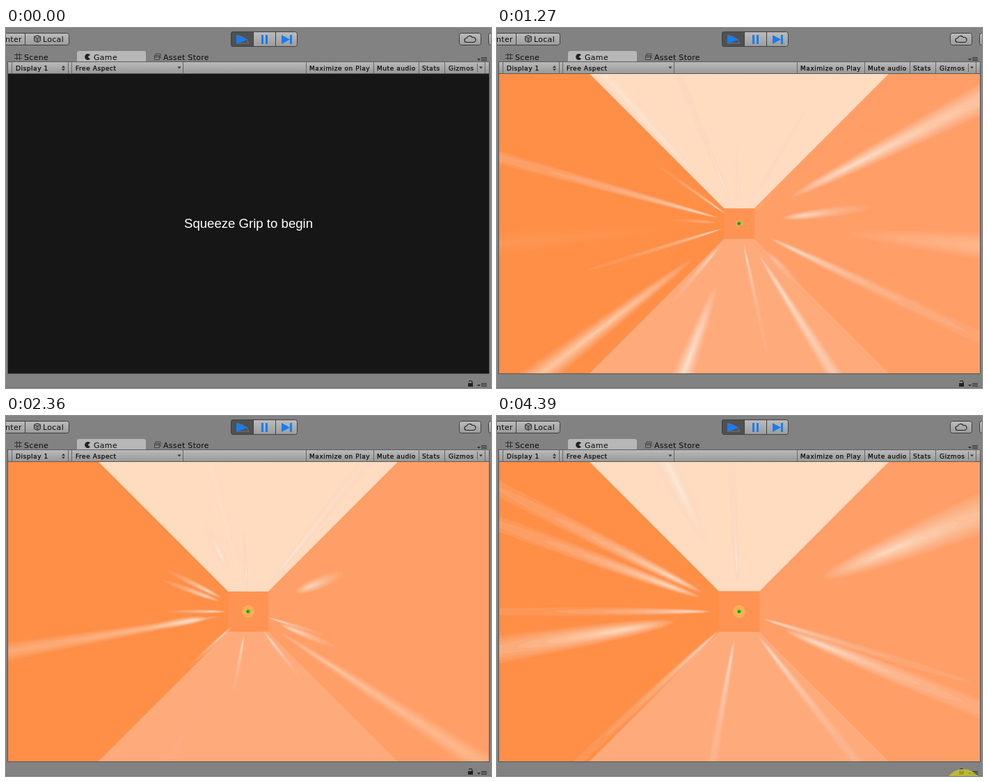
An HTML page with a canvas that plays this animation: 697 px wide and 517 px high, repeating every 4.46 s.

```html
<!DOCTYPE html>
<html lang="en">
<head>
<meta charset="utf-8">
<title>Tunnel preview</title>
<style>
html, body { margin: 0; width: 100%; height: 100%; overflow: hidden; background: #828282; }
canvas { position: absolute; left: 3px; top: 66px; }
svg { position: absolute; left: 0; top: 0; }
.tab { font: 11px "DejaVu Sans", Verdana, sans-serif; letter-spacing: .3px; fill: #0a0a0a; }
.bar { font: 9px "DejaVu Sans", Verdana, sans-serif; letter-spacing: .55px; fill: #0a0a0a; stroke: #0a0a0a; stroke-width: .25px; }
.prompt { font: 18.6px "Liberation Sans", Arial, sans-serif; fill: #fff; }
</style>
</head>
<body>
<canvas id="view" width="691" height="430"></canvas>
<svg width="697" height="517" viewBox="0 0 697 517">
  <defs>
    <linearGradient id="btn" x2="0" y2="1"><stop stop-color="#bcbcbc"/><stop offset="1" stop-color="#9c9c9c"/></linearGradient>
    <linearGradient id="strip" x2="0" y2="1"><stop stop-color="#b9b9b9"/><stop offset="1" stop-color="#989898"/></linearGradient>
    <g id="menu"><path d="M0 2h5l-2.500 3z" fill="#333"/><path d="M6 .5h8M6 2.500h8M6 4.500h8" stroke="#333"/></g>
  </defs>

  <!-- main toolbar -->
  <g fill="url(#btn)" stroke="#3f3f3f">
    <rect x="-12.500" y="7.500" width="103" height="17" rx="3"/>
    <rect x="323.500" y="5.500" width="95" height="21" rx="3"/>
    <rect x="651.500" y="7.500" width="31" height="17" rx="3"/>
    <rect x="693.500" y="7.500" width="20" height="17" rx="3"/>
    <path d="M27.500 8v16M387.500 6v20" fill="none"/>
    <path d="M355.500 5.500V26.500H326.500a3 3 0 0 1-3-3V8.500a3 3 0 0 1 3-3z" fill="#505050"/>
  </g>
  <path d="M332 10.500v11.500h17q-4-9-17-11.500z" fill="none" stroke="#777"/>
  <path d="M331 10l17 6.500-17 6.500zM367 10h3v13h-3zM373 10h3v13h-3zM396 10l12 6.500-12 6.500zM408 10h3v13h-3z" fill="#187df0"/>
  <path d="M662 20.500a3 3 0 0 1 0-6 4.500 4.500 0 0 1 8-1 3.500 3.500 0 0 1 2.500 7z" fill="none" stroke="#222" stroke-width="1.200"/>
  <path d="M45 10.500l4.500 2v6l-4.500 2-4.500-2v-6zM40.500 12.500l4.500 2 4.500-2M45 14.500v6" fill="#888" stroke="#333"/>
  <text class="tab" x="-1" y="20">nter</text>
  <text class="tab" x="53" y="20">Local</text>

  <!-- tabs -->
  <path d="M102 49V36q0-3 3-3H198q3 0 3 3V49z" fill="#b7b7b7"/>
  <path d="M15.500 36v10M19.500 36v10M12 38.500h11M12 43.500h11" stroke="#333" fill="none"/>
  <path d="M117.500 41.500L121 38.500A4.500 4.500 0 1 0 121 44.500z" fill="#222"/>
  <path d="M213.500 39.500h7v6h-7zM215 39v-2h7v7M213.500 41.500h7" fill="none" stroke="#444"/>
  <text class="tab" x="26" y="46">Scene</text>
  <text class="tab" x="126" y="46">Game</text>
  <text class="tab" x="226" y="46">Asset Store</text>
  <use href="#menu" x="677" y="42"/>

  <!-- view strip -->
  <rect x="2" y="49" width="692" height="17" fill="url(#strip)"/>
  <path d="M2 48.500H694M2 65.500H694" stroke="#5a5a5a"/>
  <path d="M8.500 49V65M89.500 49V65M94.500 49V65M254.500 49V65M431.500 49V65M528.500 49V65M593.500 49V65M630.500 49V65M677.500 51V63M688.500 49V65" stroke="#666"/>
  <path d="M80 57l2.500-3 2.500 3zM80 58.500l2.500 3 2.500-3zM246.500 55.500h5l-2.500 3zM680 55.500h5l-2.500 3z" fill="#333"/>
  <g class="bar">
    <text x="14" y="61">Display 1</text>
    <text x="100" y="61">Free Aspect</text>
    <text x="436" y="61">Maximize on Play</text>
    <text x="533" y="61">Mute audio</text>
    <text x="598" y="61">Stats</text>
    <text x="636" y="61">Gizmos</text>
  </g>
  <path d="M2.500 49V496.500H694.500V49" fill="none" stroke="#555"/>
  <path d="M0 516.500H697" stroke="#767676"/>

  <!-- bottom panel -->
  <path d="M664 510h7v5h-7z" fill="#222"/>
  <path d="M665.500 508q0-1.500 2-1.500t2.500 2v2" fill="none" stroke="#222" stroke-width="1.200"/>
  <use href="#menu" x="677" y="510"/>

  <text id="prompt" class="prompt" x="256" y="287">Squeeze Grip to begin</text>
  <path id="pointer" d="M.5.5V16l3.500-3.500 2.500 6 2.500-1-2.500-5.500H11.500z" fill="#fff" stroke="#000"/>
  <circle id="press" cx="670" cy="534" r="27" fill="#d2d01e" fill-opacity=".7"/>
</svg>
<script>
const LOOP = 4460, START = 500, STEP = 77.4, LAST = 27;
const CX = 348, CY = 280.8, SPEED = 0.002, LAYERS = 12, COUNT = 70;
const $ = id => document.getElementById(id);
const ctx = $('view').getContext('2d');
ctx.translate(-3, -66);

const clamp = x => Math.max(0, Math.min(1, x));
const lerp = (a, b, x) => a + (b - a) * x;
const rand = n => {
  const x = Math.sin(n * 12.9898) * 43758.5453;
  return x - Math.floor(x);
};

// Passing streaks: spread by the golden angle, dense at first, then sparser.
const streaks = Array.from({ length: COUNT }, (_, i) => ({
  angle: i * 137.508 % 360 - 180,
  inner: 24 + 90 * rand(i + 1) ** 2,
  at: 23 * (i / COUNT) ** 1.8 - 1,
  span: 5
}));

// Streaks that stay when the view freezes: angle, inner radius.
const resting = [
  [-116, 110], [-93, 40], [-22, 130], [-153, 60], [-160, 60], [180, 40],
  [171, 95], [137, 40], [100, 40], [52, 45], [17, 35], [22, 70]
];
for (const [angle, inner] of resting) streaks.push({ angle, inner, at: LAST, span: 8 });

function poly(fill, ...p) {
  ctx.fillStyle = fill;
  ctx.beginPath();
  for (let i = 0; i < p.length; i += 2) ctx.lineTo(p[i], p[i + 1]);
  ctx.fill();
}

function disc(fill, x, y, r) {
  ctx.fillStyle = fill;
  ctx.beginPath();
  ctx.arc(x, y, r, 0, 7);
  ctx.fill();
}

// A soft ellipse in (depth, angle) space, projected by radius = 1 / depth.
function drawStreak({ angle, inner, at, span }, k) {
  const weight = clamp(1.6 * (1 - Math.abs(k - at) / span));
  if (!weight) return;
  const mid = 0.55 / inner - (k - at) * SPEED, half = 0.45 / inner;
  const width = 1.5 + inner / 50;
  const alpha = 0.2 / (1 + width * 0.18) * weight;
  ctx.save();
  if (Math.abs(angle + 90) < 45) {
    ctx.beginPath();
    ctx.moveTo(CX, CY);
    ctx.lineTo(CX - 300, CY - 300);
    ctx.lineTo(CX + 300, CY - 300);
    ctx.clip();
  }
  for (let i = LAYERS; i > 0; i--) {
    const s = (i / LAYERS) ** 1.4;
    if (mid + half * s < 0.0016) continue;
    ctx.fillStyle = `rgba(${lerp(255, 242, s)},${lerp(251, 205, s)},${lerp(236, 185, s)},${alpha})`;
    ctx.beginPath();
    for (let j = 0; j < 40; j++) {
      const q = j * Math.PI / 20;
      const r = 1 / Math.max(0.0015, mid + half * s * Math.cos(q));
      const a = (angle + width * 1.2 * s * Math.sin(q)) * Math.PI / 180;
      ctx.lineTo(CX + r * Math.cos(a), CY + r * Math.sin(a));
    }
    ctx.fill();
  }
  ctx.restore();
}

// Pale sheet crossing the left wall for a moment.
function drawSheet(k) {
  const glow = clamp(1 - Math.abs(k - 15) / 2);
  if (!glow) return;
  const g = ctx.createLinearGradient(0, 150, 0, 385);
  g.addColorStop(0, `rgba(255,195,165,${0.1 * glow})`);
  g.addColorStop(0.6, `rgba(255,195,165,${0.7 * glow})`);
  g.addColorStop(1, `rgba(255,195,165,${0.4 * glow})`);
  poly(g, 193, 150, 324, 257, 324, 305, 247, 382);
}

function drawTunnel(k) {
  const x = clamp((k - 1) / LAST), grow = x * x * (3 - 2 * x);
  const h = lerp(19, 29.2, grow);
  const l = CX - h, r = CX + h, t = CY - h, b = CY + h;
  const L = CX - 500, R = CX + 500, T = CY - 500, B = CY + 500;
  ctx.fillStyle = '#ff8e47';
  ctx.fillRect(3, 66, 691, 430);
  poly('#ff9e67', r, t, R, T, R, B, r, b);
  poly('#ffdcc0', l, t, L, T, R, T, r, t);
  poly('#ffaa7b', l, b, L, B, R, B, r, b);
  ctx.fillStyle = '#ff9353';
  ctx.fillRect(l, t, 2 * h, 2 * h);
  drawSheet(k);
  for (const s of streaks) drawStreak(s, k);
  disc(`rgba(250,178,84,${lerp(0.3, 0.9, grow)})`, CX, CY, lerp(4.5, 9.3, grow));
  const early = k < 6;
  if (early) disc('#ffe9d0', 346, 272.5, 2);
  disc(early ? '#181008' : '#1fc132', CX, CY, 2.7);
  disc(early ? '#fff' : '#14521c', CX - 0.5, CY + 0.3, 1);
}

// The pointer appears, rests, swings up left, then leaves at lower right.
function pointerAt(t) {
  if (t < 2660 || t >= 3590) return null;
  if (t < 2740) return [147, 81];
  const back = clamp((t - 2880) / 160), out = clamp((t - 3040) / 470);
  return out ? [lerp(213, 652, out), lerp(146, 499, out)]
             : [lerp(473, 213, back), lerp(266, 146, back)];
}

function render(now) {
  const t = now % LOOP;
  const step = Math.floor((t - START + 12) / STEP);
  const playing = t >= START;
  if (playing) drawTunnel(Math.min(LAST, step));
  else {
    ctx.fillStyle = '#161616';
    ctx.fillRect(3, 66, 691, 430);
  }
  const spot = pointerAt(t);
  if (spot) $('pointer').setAttribute('transform', `translate(${spot})`);
  $('pointer').style.display = spot ? '' : 'none';
  $('prompt').style.display = playing ? 'none' : '';
  $('press').style.display = t >= 4390 ? '' : 'none';
}

const begin = performance.now();
(function frame() {
  render(performance.now() - begin);
  requestAnimationFrame(frame);
})();
</script>
</body>
</html>
```
